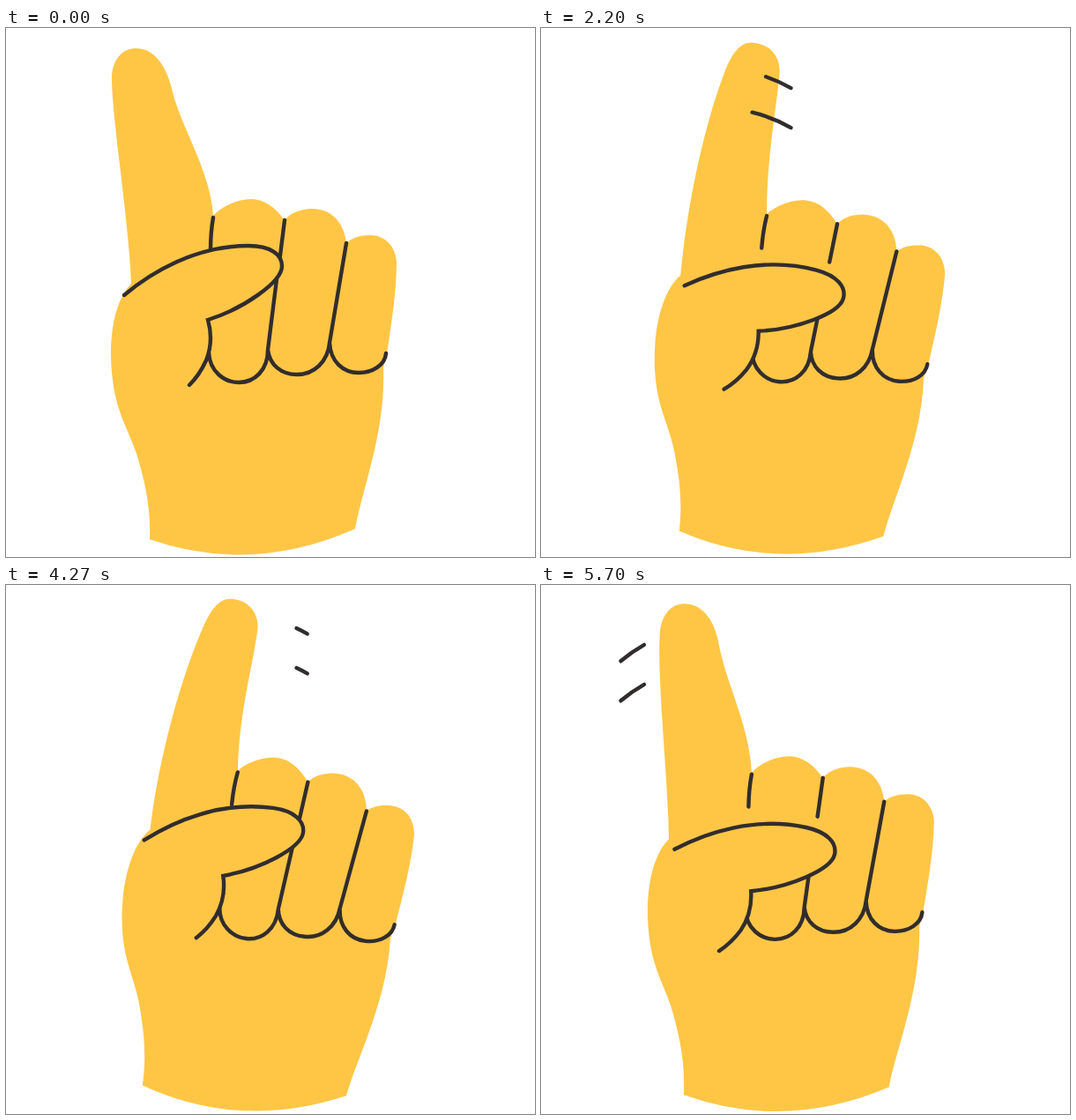
Write an HTML page that moves like this. It is 600x600 px and loops after 5.73 s.

```html
<!DOCTYPE html>
<html lang="en">
<head>
<meta charset="utf-8">
<title>Wagging finger</title>
<style>
  html, body { margin: 0; width: 100%; height: 100%; overflow: hidden; background: #fff; }
  svg { display: block; width: 100%; height: 100%; }
  .skin { fill: #ffc646; }
  .line { fill: none; stroke: #322d2d; stroke-width: 4.4; stroke-linecap: round; }
</style>
</head>
<body>
<svg viewBox="0 0 600 600">
  <defs>
    <path id="thumbShape" d="M134 303C165 277 215 247 275 247C300 247 313 257 313 270C313 288 270 318 229 331
      C233 345 233 362 227 377C222 388 216 397 208 405"/>
  </defs>
  <g id="hand">
    <path id="finger" class="skin"/>
    <path class="skin" d="M142 290C127 305 119 335 119 370C120 440 143 455 153 500C161 530 164 555 163 580
      Q279 620 396 568C404 522 431 458 428 385L432 370C437 335 443 300 443 265C441 245 428 235 413 235
      C402 235 392 238 386 244C384 222 370 205 347 205C335 205 322 210 316 218
      C306 204 293 194 278 194C262 194 244 203 235 213Z"/>
    <path class="line" d="M235 215Q232 232 232 252M316 218L310.500 262M307 285L297 365M386 244L367 357
      M230 368C231 390 248 402 264 402C282 402 297 388 297 365C299 382 312 393 330 393
      C350 393 365 378 367 357C368 378 382 391 400 391C416 391 430 382 431 369"/>
    <g id="thumb">
      <use href="#thumbShape" class="skin"/>
      <use href="#thumbShape" class="line"/>
    </g>
  </g>
  <path id="trails" class="line"/>
</svg>
<script>
  const LOOP = 5730, CYCLE = 3770;
  const RADIUS = 169, GAP = 45;   // trail arcs
  const el = id => document.getElementById(id);
  const hand = el('hand'), finger = el('finger'), thumb = el('thumb'), trails = el('trails');

  const clamp = v => Math.min(1, Math.max(0, v));

  // Swings 0 -> 1 -> 0 `count` times per cycle, running ahead by `lead` ms at mid-cycle.
  function swing(t, count, lead) {
    const ahead = t + lead * Math.sin(Math.PI * t / CYCLE) ** 2;
    return Math.sin(Math.PI * count * ahead / CYCLE) ** 2;
  }

  const turn = t => 1.07 * swing(t, 2, 130);
  const bend = t => 1.1 * swing(t, 4, 70);
  const thumbAngle = t => 11.5 * swing(t, 1, 40);

  // Each stroke to the right (start, arc centre) is followed by one back to the left.
  const strokes = [[20, 226, 211], [953, 257, 201], [1883, 200, 215], [2892, 282, 209]];
  const sweeps = strokes.flatMap(([start, cx, cy]) => {
    const side = turn(start + 930);
    return [
      { start, cx, cy, dir: 1 },
      { start: start + 460, cx: 195 + 60 * side, cy: 215 - 12 * side, dir: -1 }
    ];
  });

  function arc({ cx, cy, dir }, from, to, drop) {
    const point = p => {
      const a = (-40.4 + 70 * (dir > 0 ? p : 1 - p)) * Math.PI / 180;
      return `${cx + RADIUS * Math.sin(a)} ${cy + drop - RADIUS * Math.cos(a)}`;
    };
    return `M${point(from)}A${RADIUS} ${RADIUS} 0 0 ${dir > 0 ? 1 : 0} ${point(to)}`;
  }

  function trailPath(t) {
    let d = '';
    for (const sweep of sweeps) {
      const age = t - sweep.start;
      for (const row of [0, 1]) {
        const head = clamp(age / 300), tail = clamp((age - 132 - 17 * row) / 218);
        if (tail < head) d += arc(sweep, tail, head, row * GAP);
      }
    }
    return d;
  }

  // The base stays put; the tip and sides shift with the bend w.
  function fingerPath(w) {
    const top = 23 - 3 * w;
    return `M142 290
      C${139 + 4 * w} 215 ${121 + 34 * w} ${110 + 10 * w} ${120 + 54 * w} ${60 - 3 * w}
      C${119 + 62 * w} ${38 - 5 * w} ${131 + 59 * w} ${top} ${147 + 57 * w} ${top}
      C${167 + 55 * w} ${top} ${180 + 58 * w} ${40 - 8 * w} ${187 + 50 * w} ${65 - 9 * w}
      C${197 + 39 * w} ${112 - 12 * w} ${232 - 2 * w} ${160 - 10 * w} 235 213
      L200 300Z`;
  }

  // The picture holds for uneven steps, finer in the last part.
  function held(t) {
    const r = t % 100;
    return t - r + (r < 30 ? 0 : r >= 70 && t >= 3600 ? 70 : 30);
  }

  function draw(now) {
    const t = held(now % LOOP) % CYCLE;
    const s = turn(t);
    const matrix = [1 - 0.021 * s, 0.1624 * s, -0.162 * s, 1 - 0.011 * s, 84.3 * s, -40 * s];
    hand.setAttribute('transform', `matrix(${matrix})`);
    finger.setAttribute('d', fingerPath(bend(t)));
    thumb.setAttribute('transform', `rotate(${thumbAngle(t)} 149 375)`);
    trails.setAttribute('d', trailPath(t));
  }

  let origin;
  function tick(now) {
    origin ??= now;
    draw(now - origin);
    requestAnimationFrame(tick);
  }
  draw(0);
  requestAnimationFrame(tick);
</script>
</body>
</html>
```
